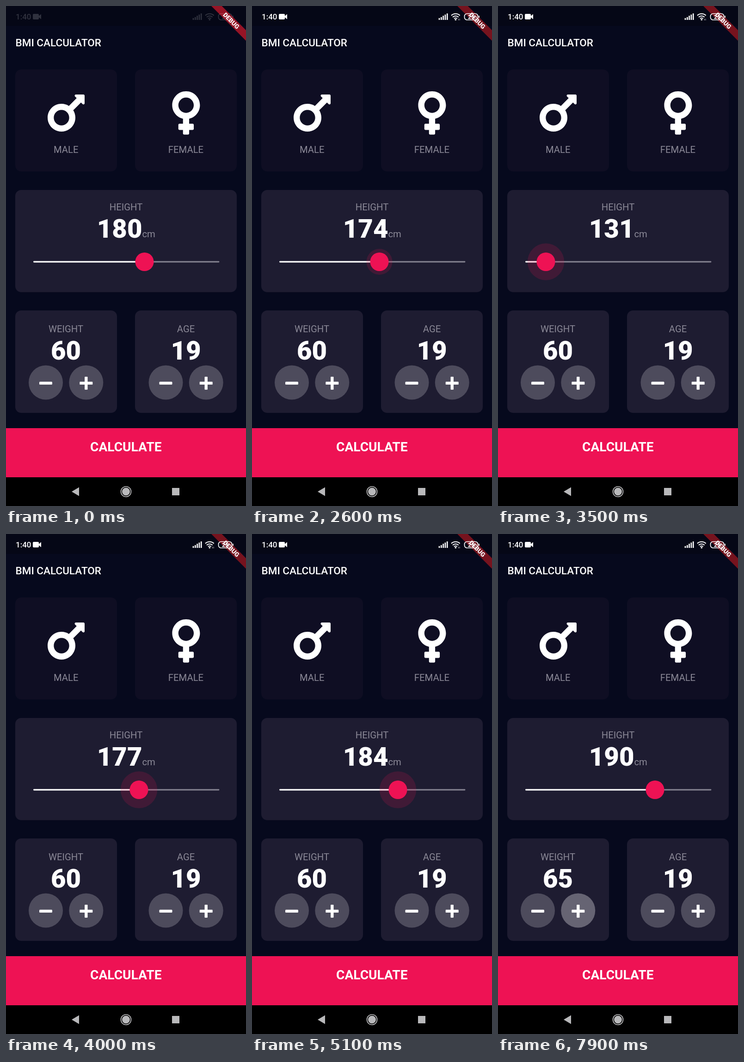
An HTML page that plays this animation: 519 px wide and 1079 px high, repeating every 8 s.

```html
<!DOCTYPE html>
<html lang="en">
<head>
<meta charset="utf-8">
<title>BMI calculator</title>
<style>
  html, body { margin: 0; width: 100%; height: 100%; overflow: hidden; background: #06091d; }
  svg { display: block; width: 519px; height: 1079px; }
  text { font-family: Roboto, Arial, sans-serif; fill: #fff; }
  .mid { text-anchor: middle; }
  .label { font-size: 20.3px; fill: #8b8997; }
  .number { font-size: 56.2px; font-weight: 900; }
  .card { fill: #1e1c31; }
  .idle { fill: #0f0e23; }
  .pink { fill: #ee1254; }
  .round { fill: #4d4b5c; }
  .icon { fill: #fff; }
</style>
</head>
<body>
<svg viewBox="0 0 519 1079">
  <defs>
    <g id="minus"><circle class="round" r="37"/><rect class="icon" x="-14" y="-1.8" width="28" height="6.4" rx="1.6"/></g>
    <g id="plus"><circle class="round" r="37"/></g>
    <path id="cross" class="icon" stroke="#fff" stroke-width="2.4" stroke-linejoin="round"
      d="M-2-11.4h4v10.800h10.800v4h-10.800v10.800h-4v-10.800h-10.800v-4h10.800z"/>
  </defs>
  <rect width="519" height="1079" fill="#06091d"/>
  <rect width="519" height="43" fill="#000" opacity=".25"/>

  <g id="banner" transform="translate(519 0) rotate(45)">
    <rect id="ribbon" x="-53" y="37" width="106" height="16"/>
    <text id="ribbonText" class="mid" y="49.800" font-size="13.500" font-weight="900">DEBUG</text>
  </g>

  <g id="status">
    <text x="21" y="29" font-size="17" font-weight="500">1:40</text>
    <path class="icon" d="M60 17h9q2 0 2 2v2.500l5-4v11l-5-4v2.500q0 2-2 2h-9q-2 0-2-2v-8q0-2 2-2z"/>
    <path stroke="#fff" stroke-width="2.600" d="M405 30v-4M409.300 30v-6M413.600 30v-9M417.900 30v-11.500M422.200 30v-14"/>
    <g fill="none" stroke="#fff" stroke-width="2.100">
      <path d="M431 20.500a13.400 13.400 0 0 1 18.600 0M434 24a9 9 0 0 1 12.600 0M437 27.200a4.800 4.800 0 0 1 6.600 0"/>
      <rect x="459.500" y="16.500" width="29" height="13.500" rx="5.500" stroke-width="1.700"/>
      <path d="M491 21v4.500" stroke-width="1.700"/>
      <path id="traffic" d="M446.500 27.500v3.500M449 27.500v3.500" stroke-width="1"/>
    </g>
    <circle class="icon" cx="440.300" cy="29.500" r="1.800"/>
    <text class="mid" x="474" y="27.500" font-size="12" font-weight="700">25</text>
  </g>

  <text x="20.500" y="87" font-size="22.500" font-weight="500">BMI CALCULATOR</text>

  <rect class="idle" x="20" y="137" width="220" height="220" rx="13"/>
  <rect class="idle" x="279" y="137" width="220" height="220" rx="13"/>
  <path class="icon" transform="translate(90 177.700) scale(.2083)" d="M372 64h-79c-10.700 0-16 12.900-8.500 20.500l16.900 16.900-80.700 80.700C198.500 167.100 172.200 160 144 160 64.500 160 0 224.500 0 304s64.500 144 144 144 144-64.500 144-144c0-28.200-8.100-54.500-22.100-76.700l80.700-80.700 16.900 16.900c7.600 7.600 20.500 2.200 20.500-8.500V76c0-6.600-5.400-12-12-12zM144 384c-44.100 0-80-35.900-80-80s35.900-80 80-80 80 35.900 80 80-35.900 80-80 80z"/>
  <path class="icon" transform="translate(359.400 177.400) scale(.2083)" d="M288 176c0-79.500-64.500-144-144-144S0 96.500 0 176c0 68.500 47.900 125.900 112 140.400V368H76c-6.600 0-12 5.400-12 12v40c0 6.600 5.400 12 12 12h36v36c0 6.600 5.400 12 12 12h40c6.600 0 12-5.400 12-12v-36h36c6.600 0 12-5.400 12-12v-40c0-6.600-5.400-12-12-12h-36v-51.600c64.100-14.600 112-71.900 112-140.400zm-224 0c0-44.100 35.900-80 80-80s80 35.900 80 80-35.900 80-80 80-80-35.900-80-80z"/>
  <text class="label mid" x="129.700" y="316.500">MALE</text>
  <text class="label mid" x="389" y="316.500">FEMALE</text>

  <rect class="card" x="20" y="397" width="479" height="220.500" rx="13"/>
  <text class="label mid" x="259.500" y="441">HEIGHT</text>
  <text id="height" class="number" x="294.500" y="499.500" text-anchor="end"></text>
  <text class="label" x="294.500" y="499">cm</text>
  <path d="M60.500 552H460" stroke="#858391" stroke-width="2.800" stroke-linecap="round"/>
  <path id="track" stroke="#fff" stroke-width="2.800" stroke-linecap="round"/>
  <circle id="halo" class="pink" cy="552" opacity=".16"/>
  <circle id="thumb" class="pink" cy="552" r="20"/>

  <rect class="card" x="20" y="657" width="220" height="221" rx="13"/>
  <rect class="card" x="279" y="657" width="220" height="221" rx="13"/>
  <text class="label mid" x="129.500" y="704.300">WEIGHT</text>
  <text class="label mid" x="389" y="704.300">AGE</text>
  <text id="weight" class="number mid" x="129.500" y="762.500"></text>
  <text class="number mid" x="389" y="762.500">19</text>
  <use href="#minus" x="86" y="812.500"/>
  <use href="#plus" x="173.300" y="812.500"/>
  <circle id="glow" class="icon" cx="173.300" cy="812.500" r="37"/>
  <use href="#cross" x="173.300" y="812.500"/>
  <use href="#minus" x="345.500" y="812.500"/>
  <use href="#plus" x="432.700" y="812.500"/>
  <use href="#cross" x="432.700" y="812.500"/>

  <rect class="pink" y="911" width="519" height="106"/>
  <text class="mid" x="259.300" y="960.500" font-size="28.100" font-weight="700">CALCULATE</text>

  <rect y="1017" width="519" height="62"/>
  <g fill="#b9b9bb">
    <path d="M142 1048l16-9.500v19z"/>
    <circle cx="259.500" cy="1048" r="8.500"/>
    <circle cx="259.500" cy="1048" r="11" fill="none" stroke="#b9b9bb" stroke-width="1.700"/>
    <rect x="359" y="1040" width="16" height="16"/>
  </g>
</svg>
<script>
  const $ = id => document.getElementById(id);
  const set = (id, name, value) => $(id).setAttribute(name, value);
  const LOOP = 8000, STEP = 100;

  // Each key is [time in ms, value].
  const drag = [[2500, 180], [2600, 174], [3000, 157], [3400, 136], [3600, 125], [4000, 177],
    [4300, 199], [4600, 208], [5100, 184], [5300, 188], [5500, 190]];
  const haloSize = [[2500, 0], [2600, 28], [2700, 39.7], [5900, 39.7], [6000, 22], [6100, 0]];
  const press = [[6500, 0], [6600, .09], [6700, .14], [6900, .14], [7200, 0], [7300, 0], [7400, .09], [7500, .14]];
  const wake = [[200, 0], [900, 1]];
  const taps = [6600, 6900, 7400, 7700, 7900];

  function at(keys, t) {
    const i = keys.findIndex(k => k[0] >= t);
    if (i < 0) return keys[keys.length - 1][1];
    if (i === 0) return keys[0][1];
    const [t0, a] = keys[i - 1], [t1, b] = keys[i];
    return a + (b - a) * (t - t0) / (t1 - t0);
  }

  const blend = (a, b, k) => `rgb(${a.map((v, i) => Math.round(v + (b[i] - v) * k))})`;

  function draw(t) {
    const cm = Math.round(at(drag, t)), x = 59.5 + (cm - 120) * 4;
    $('height').textContent = cm;
    set('track', 'd', `M60.5 552H${x}`);
    set('thumb', 'cx', x);
    set('halo', 'cx', x);
    set('halo', 'r', at(haloSize, t));

    $('weight').textContent = 60 + taps.filter(tap => tap <= t).length;
    set('glow', 'opacity', at(press, t));

    const lit = at(wake, t);
    set('status', 'opacity', .17 + .83 * lit);
    set('traffic', 'opacity', t > 200 && t < 5300 ? .7 : 0);
    set('ribbon', 'fill', blend([150, 20, 38], [118, 19, 30], lit));
    set('ribbonText', 'fill', blend([228, 214, 218], [205, 178, 186], lit));
  }

  function frame() {
    draw(Math.floor(performance.now() % LOOP / STEP) * STEP);
    requestAnimationFrame(frame);
  }
  frame();
</script>
</body>
</html>
```
